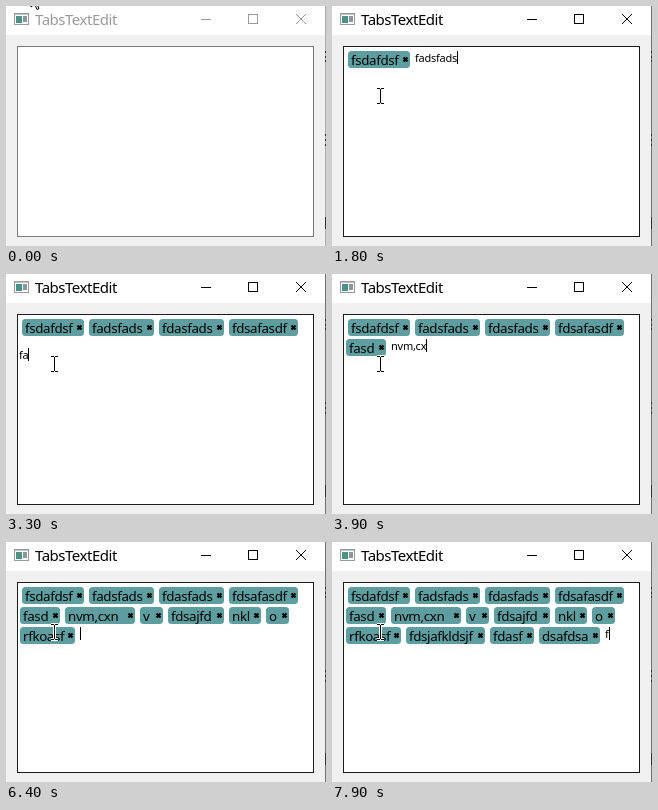
Write an HTML page that moves like this. It is 320 px wide and 240 px high and loops after 8000 ms.

```html
<!DOCTYPE html>
<html lang="en">
<head>
<meta charset="utf-8">
<title>TabsTextEdit</title>
<style>
  html, body { margin: 0; width: 100%; height: 100%; overflow: hidden; background: #f0f0f0; }
  svg { display: block; width: 100vw; height: 100vh; }
  text { font-family: "Noto Sans", "Open Sans", sans-serif; white-space: pre; }
  .chrome { color: #999; }
  .edge { stroke: #aaa; }
  .frame { stroke: #7a7a7a; }
  .active .chrome { color: #000; }
  .active .edge { stroke: #707070; }
  .active .frame { stroke: #1c1c1c; }
  .title { font-size: 15px; letter-spacing: -.48px; fill: currentColor; }
  .buttons { fill: none; stroke: currentColor; }
  .tag rect { fill: #5f9ea0; }
  .tag text { font-size: 13.33px; letter-spacing: -.35px; }
  .tag path { stroke: #000; stroke-width: 2.2; }
  #typed { font-size: 11px; letter-spacing: -.25px; }
  #beam path { fill: none; }
</style>
</head>
<body>
<svg id="stage" viewBox="0 0 320 240">
  <rect width="320" height="240" fill="#f0f0f0"/>
  <rect width="320" height="29" fill="#fff"/>
  <path class="edge" d="M319.5 0V240"/>
  <path d="M319.5 45v2m0 3v2m0 2v2M319.5 128v2m0 3v2m0 3v2M319.5 211v12" stroke="#333"/>

  <g class="icon">
    <rect x="8.5" y="7.5" width="14" height="11" fill="#fff" stroke="#9a9a9a"/>
    <path d="M9 8.5H22" stroke="#b9c4c8"/>
    <rect x="10" y="10" width="6" height="7" fill="#4a9288"/>
    <rect x="17" y="10" width="4" height="6" fill="#8b979b"/>
  </g>
  <g class="chrome">
    <text class="title" x="29" y="19">TabsTextEdit</text>
    <g class="buttons">
      <path d="M195 13.5H205"/>
      <rect x="242.5" y="8.5" width="9" height="9"/>
      <path d="M290 8L300 18M300 8L290 18"/>
    </g>
  </g>

  <rect class="frame" x="11.5" y="40.5" width="296" height="190" fill="#fff"/>
  <g id="tags"></g>
  <text id="typed"></text>
  <rect id="caret" width="1" height="13"/>

  <path id="arrow" d="M0 0V16L3.7 13 6 18.5 8 17.6 5.7 12.4H11Z" fill="#fff" stroke="#000"/>
  <g id="beam">
    <path d="M-3-7.5H4M.5-7V7M-3 7.5H4" stroke="#fff" stroke-width="3"/>
    <path d="M-3-7.5H0M1-7.5H4M.5-7V7M-3 7.5H0M1 7.5H4" stroke="#000"/>
  </g>
</svg>
<script>
const LOOP = 8000, FOCUS = 400, GAP = 5;

// label, x, row, width, time it becomes a tag
const tags = [
  ['fsdafdsf', 16, 0, 62, 1200],
  ['fadsfads', 83, 0, 65, 2000],
  ['fdasfads', 153, 0, 65, 2600],
  ['fdsafasdf', 223, 0, 69, 3200],
  ['fasd', 14, 1, 40, 3600],
  ['nvm,cxn', 59, 1, 70, 4000],
  ['v', 134, 1, 23, 4100],
  ['fdsajfd', 162, 1, 56, 4600],
  ['nkl', 223, 1, 32, 5000],
  ['o', 260, 1, 23, 5600],
  ['rfkoasf', 14, 2, 55, 6400],
  ['fdsjafkldsjf', 74, 2, 79, 7200],
  ['fdasf', 158, 2, 44, 7600],
  ['dsafdsa', 207, 2, 61, 7900],
  ['', 273, 2, 0, Infinity]
].map(([label, x, row, width, at]) => ({ label, x, row, width, at }));

// time: letters of the pending tag typed so far
const keys = Object.entries({
  900: 4, 1000: 8,
  1500: 2, 1600: 4, 1700: 6, 1800: 8,
  2200: 2, 2300: 4, 2400: 6, 2500: 8,
  2800: 2, 2900: 4, 3000: 7, 3100: 9,
  3300: 2, 3500: 4,
  3700: 2, 3800: 4, 3900: 6,
  4000: 1,
  4300: 3, 4400: 6,
  4700: 2, 4800: 3,
  5200: 1,
  5900: 2, 6000: 5, 6200: 7,
  6500: 2, 6600: 4, 6700: 7, 6800: 9, 6900: 12,
  7400: 3, 7500: 5,
  7700: 4
}).map(([at, count]) => ({ at: +at, count }));

const pointer = [
  { at: 0, x: 25, y: -15 },
  { at: 100, x: 31, y: 12 },
  { at: 200, x: 43, y: 62 },
  { at: 300, x: 48, y: 90 }
];

const $ = id => document.getElementById(id);
const [stage, typed, caret, arrow, beam] = ['stage', 'typed', 'caret', 'arrow', 'beam'].map($);
const latest = (list, t) => list.filter(e => e.at <= t).pop();
const rowTop = row => 45 + 20 * row;
const show = (el, on) => el.setAttribute('visibility', on ? 'visible' : 'hidden');
const place = (el, x, y) => { el.setAttribute('x', x); el.setAttribute('y', y); };

$('tags').innerHTML = tags.map(({ label, x, row, width }) => `
  <g class="tag" transform="translate(${x} ${rowTop(row)})">
    <rect width="${width}" height="17" rx="3.5"/>
    <text x="3" y="14">${label}</text>
    ${width ? `<path d="M${width - 6.5} 6.5l4 4m0-4l-4 4"/>` : ''}
  </g>`).join('');
const tagEls = [...document.querySelectorAll('.tag')];

function drawTyping(t) {
  const next = tags.findIndex(tag => t < tag.at);
  const tag = tags[next], last = tags[next - 1];
  const key = latest(keys, t);
  const fresh = key && (!last || key.at >= last.at);
  let text = fresh ? tag.label.slice(0, key.count) : '';
  if (!tag.label) text = 'f';

  const newRow = !last || last.row < tag.row;
  let x = newRow ? tag.x - 1 : tag.x;
  let y = rowTop(tag.row);
  if (last && newRow) {
    const end = last.x + last.width + GAP;
    if (!text && end < 292) {
      x = end;
      y = rowTop(last.row);
    } else {
      y += 9; // a line without tags sits lower
    }
  }
  typed.textContent = text;
  place(typed, x, y + 11);
  const length = text ? typed.getComputedTextLength() : 0;
  place(caret, Math.round(x + length), y);
  show(caret, t >= FOCUS);
}

function draw(t) {
  stage.classList.toggle('active', t >= FOCUS);
  tagEls.forEach((el, i) => show(el, t >= tags[i].at));
  drawTyping(t);

  const { x, y } = latest(pointer, t);
  const inside = y > 40;
  show(arrow, !inside);
  show(beam, inside);
  (inside ? beam : arrow).setAttribute('transform', `translate(${x} ${y})`);
}

const start = performance.now();
function tick() {
  draw((performance.now() - start) % LOOP);
  requestAnimationFrame(tick);
}
tick();
</script>
</body>
</html>
```
